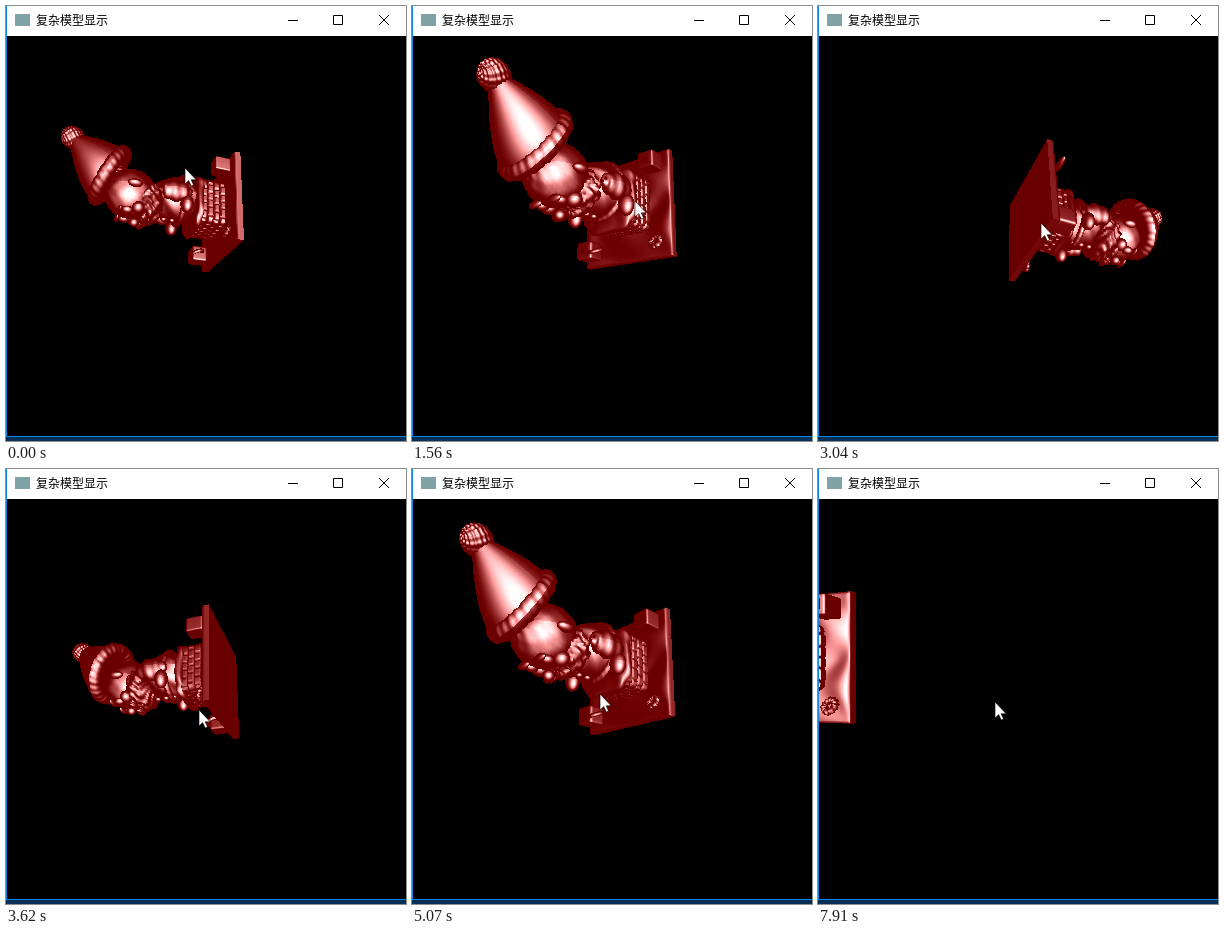
An HTML page with a canvas for the animation above (8000 ms loop, 400 px wide and 435 px high).

```html
<!DOCTYPE html>
<html lang="zh">
<head>
<meta charset="utf-8">
<style>
html, body { margin: 0; width: 100%; height: 100%; overflow: hidden; background: #000; }
canvas { position: absolute; left: 1px; top: 30px; }
svg { position: absolute; left: 0; top: 0; }
text { font: 12px "Noto Sans CJK SC", "Noto Sans CJK", "Noto Sans", sans-serif; }
</style>
</head>
<body>
<canvas id="view" width="399" height="400"></canvas>
<svg width="400" height="435">
  <rect width="400" height="30" fill="#fff"/>
  <rect width="1" height="431" fill="#0c86e2"/>
  <rect y="430" width="400" height="1" fill="#0c86e2"/>
  <rect y="431" width="400" height="4" fill="#063057"/>
  <rect x="9" y="8" width="15" height="12" fill="#7fa3a6"/>
  <text x="30" y="19">复杂模型显示</text>
  <path d="M282 14.5h10M327.5 9.5h9v9h-9zM373 9l10 10M383 9l-10 10" fill="none" stroke="#000"/>
  <path id="cursor" d="M0 0V16L3.7 12.6 6.2 18 8.6 17 6.2 11.8H11.2Z" fill="#fff" stroke="#000" stroke-width=".6"/>
</svg>
<script>
const W = 399, H = 400, DEPTH = 400, LOOP = 8000;
const { sin, cos, abs, sign, min, max, floor, ceil, round, hypot, PI } = Math;
const ctx = document.getElementById('view').getContext('2d');
const cursor = document.getElementById('cursor');
const image = ctx.createImageData(W, H);
const pixels = new Uint32Array(image.data.buffer);
const zbuf = new Float32Array(W * H);

// Model space: x to the figure's side, y to its front, z up.
const verts = [], tris = [];
let offset = [0, 0, 0];

// Adds a parametric surface fn(a, b), a and b in 0..1, with smooth normals.
function surf(n, m, fn) {
  const first = verts.length, grid = [];
  for (let j = 0; j <= m; j++)
    for (let i = 0; i <= n; i++) grid.push(fn(i / n, j / m).map((v, k) => v + offset[k]));
  const at = (i, j) => grid[min(m, max(0, j)) * (n + 1) + min(n, max(0, i))];
  const diff = (p, q) => p.map((v, k) => v - q[k]);
  for (let j = 0; j <= m; j++)
    for (let i = 0; i <= n; i++) {
      const [ax, ay, az] = diff(at(i + 1, j), at(i - 1, j));
      const [bx, by, bz] = diff(at(i, j + 1), at(i, j - 1));
      const nx = ay * bz - az * by, ny = az * bx - ax * bz, nz = ax * by - ay * bx;
      const len = hypot(nx, ny, nz) || 1;
      verts.push([...at(i, j), nx / len, ny / len, nz / len]);
      if (i < n && j < m) {
        const p = first + j * (n + 1) + i, q = p + n + 1;
        tris.push([p, p + 1, q], [p + 1, q + 1, q]);
      }
    }
}

const spow = (v, e) => sign(v) * abs(v) ** e;

// Ellipsoid; a small e squares it off, bump(lon, lat) roughens it.
function blob([x, y, z], [rx, ry, rz], e = 1, bump = () => 1, n = 28, m = 18) {
  surf(n, m, (a, b) => {
    const lon = a * 2 * PI, lat = (b * .98 + .01 - .5) * PI;
    const k = bump(lon, lat), w = k * spow(cos(lat), e);
    return [x + rx * w * spow(cos(lon), e), y + ry * w * spow(sin(lon), e), z + rz * k * spow(sin(lat), e)];
  });
}

// Tilts a point backwards by an angle and moves it to a centre.
const lean = (x, y, z, angle, [cx, cy, cz]) => [
  cx + x, cy + y * cos(angle) - z * sin(angle), cz + y * sin(angle) + z * cos(angle)];

function ring(centre, R, tube, angle, groove, n = 120) {
  surf(n, 14, (a, b) => {
    const lon = a * 2 * PI, t = b * 2 * PI;
    const k = tube * (1 + groove * (sin(lon * 29 + 2 * sin(t)) + .7 * sin(lon * 13 + t)));
    return lean((R + k * cos(t)) * cos(lon), (R + k * cos(t)) * sin(lon), k * sin(t), angle, centre);
  });
}

function buildPlinth() {
  surf(70, 70, (a, b) => {
    const x = 1.12 * (2 * a - 1), y = 1.12 * (2 * b - 1), q = max(abs(x), abs(y));
    const snow = 2 * sin(5.5 * x + 2 * sin(4 * y)) + 1.6 * sin(6 * y - 2 * x);
    const clip = v => 63 * min(1, max(-1, v));
    return [clip(x), clip(y), 4 + snow * max(0, 1 - q ** 6) - 2 * min(1, q) ** 14 - 70 * max(0, q - 1)];
  });
  surf(6, 6, (a, b) => [63 - 126 * a, 126 * b - 63, -6]);
  // brick chimney with a snowy rim
  surf(160, 40, (a, b) => {
    const lon = a * 2 * PI, row = floor(b * 4);
    const joint = b * 4 % 1 < .16 || (a * 20 + row % 2 / 2) % 1 < .12;
    const k = (joint ? 30 : 32) / (cos(lon) ** 8 + sin(lon) ** 8) ** .125;
    return [6 + k * cos(lon), k * sin(lon), 4 + 34 * b];
  });
  blob([6, 0, 40], [37, 37, 7], .6, (o, l) => 1 + .03 * sin(o * 7 + l * 3), 60);
  // a gift, a basket and a wreath in three corners, a cane in the fourth
  blob([46, -46, 15], [10, 10, 11], .2);
  blob([-46, 46, 15], [12, 11, 11], .25);
  ring([-32, 47, 20], 8, 2.5, 1.2, 0, 24);
  ring([46, 46, 9], 6, 3, .4, .2, 40);
  blob([-46, -46, 18], [13, 4, 4]);
}

function buildFigure() {
  offset = [9, -5, 4];
  blob([0, 0, 60], [33, 29, 36], 1, (o, l) => 1 + .03 * sin(o * 6 + l * 8), 40, 24);
  ring([0, 0, 56], 31, 4, 0, .03);
  for (let z = 54; z < 80; z += 11) blob([0, 30, z], [4, 3, 4]);
  for (const side of [-1, 1]) {
    blob([side * 35, 6, 70], [11, 14, 20], 1, (o, l) => 1 + .07 * sin(l * 9 + o));
    blob([side * 36, 22, 56], [9, 12, 8]);
    blob([side * 33, 4, 120], [6, 5, 9]);
    blob([side * 13, 31, 124], [6, 5, 7]);
    blob([side * 13, 32, 133], [9, 4, 3]);
    blob([side * 17, 28, 112], [9, 8, 8]);
    blob([side * 9, 37, 104], [11, 6, 5], 1, (o, l) => 1 + .08 * sin(o * 9 + l * 4));
  }
  blob([0, 2, 120], [32, 32, 33], 1, (o, l) => 1 + .015 * sin(o * 8) * sin(l * 9), 40, 26);
  blob([0, 40, 113], [6, 6, 6]);
  blob([0, 34, 96], [7, 4, 3]);
  blob([0, 13, 97], [33, 25, 19], 1,
    (o, l) => 1 + .05 * sin(o * 13 + 4 * sin(l * 4)) + .04 * sin(o * 7 - l * 9), 70, 24);
  // hat
  const crown = [0, -20, 148];
  ring(crown, 34, 9, .45, .045);
  surf(60, 30, (a, b) => {
    const o = a * 2 * PI, R = 7 + 31 * (1 - b ** 1.5);
    return lean(R * cos(o) + 5 * b, R * sin(o), 64 * b, .69, crown);
  });
  blob([5, -62, 199], [14, 14, 14], 1, (o, l) => 1 + .06 * sin(o * 11 + l * 3) * cos(l * 13), 60, 40);
}

buildPlinth();
buildFigure();

// time, yaw, pitch, distance
const poses = [
  [0, 1.22, .42, -154], [650, 5.3, .2, -70], [900, 6.28, 0, 0], [1160, 6.5, .1, -20],
  [1700, 7.45, .42, -150], [2370, 6.28, .85, -76], [3616, 1.9, .445, -105], [4000, 1, .3, -30],
  [5070, .8, .305, -75], [5360, .8, .305, -75], [6470, .51, .15, -60], [7490, .31, 0, 0]
];
// time, x, y of the pointer
const pointer = [
  [0, 179, 162], [900, 209, 193], [2370, 247, 198], [3616, 193, 241],
  [5070, 188, 225], [6470, 184, 232], [7490, 182, 232], [7910, 177, 233]
];

function track(keys, t) {
  const i = keys.findIndex(k => k[0] > t);
  if (i < 0) return keys[keys.length - 1];
  const a = keys[i - 1], b = keys[i], f = (t - a[0]) / (b[0] - a[0]);
  return a.map((v, k) => v + (b[k] - v) * f);
}

// The window repaints in bursts: first repaint, last repaint, count.
const steps = [0];
for (const [from, to, count] of [
  [150, 1025, 8], [1160, 1290, 2], [1428, 2250, 7], [2370, 3340, 8], [3470, 4200, 6],
  [4630, 5070, 2], [5500, 6470, 8], [6620, 7490, 7], [7910, 7910, 1]
]) for (let i = 0; i < count; i++) steps.push(from + (to - from) * (i / max(1, count - 1)));

// Red ambient plus a tight white highlight.
const shades = Uint32Array.from({ length: 256 }, (_, i) => {
  const light = 1.1 * (i / 255) ** 7;
  const red = min(255, 104 + 240 * light), rest = min(255, max(0, 260 * (light - .02)));
  return 0xff000000 | rest << 16 | rest << 8 | red;
});

function fillTriangle(a, b, c) {
  const area = (b.x - a.x) * (c.y - a.y) - (b.y - a.y) * (c.x - a.x);
  if (!area) return;
  const x0 = max(0, ceil(min(a.x, b.x, c.x))), x1 = min(W - 1, floor(max(a.x, b.x, c.x)));
  const y0 = max(0, ceil(min(a.y, b.y, c.y))), y1 = min(H - 1, floor(max(a.y, b.y, c.y)));
  for (let y = y0; y <= y1; y++)
    for (let x = x0; x <= x1; x++) {
      const v = ((x - a.x) * (c.y - a.y) - (y - a.y) * (c.x - a.x)) / area;
      const w = ((b.x - a.x) * (y - a.y) - (b.y - a.y) * (x - a.x)) / area;
      const u = 1 - v - w;
      if (u < 0 || v < 0 || w < 0) continue;
      const near = u * a.s + v * b.s + w * c.s, p = y * W + x;
      if (near <= zbuf[p]) continue;
      zbuf[p] = near;
      pixels[p] = shades[floor(255 * min(1, max(0, u * a.l + v * b.l + w * c.l)))];
    }
}

function draw(t) {
  const [, yaw, pitch, tz] = track(poses, t);
  const slide = min(1, max(0, (t - 5360) / 2130));
  const tx = 17 - 236 * slide, ty = -30 - 10 * slide;
  const cy = cos(yaw), sy = sin(yaw), cp = cos(pitch), sp = sin(pitch);
  const turn = (x, y, z) => [
    x * cy - z * sy, y * cp - sp * (x * sy + z * cy), y * sp + cp * (x * sy + z * cy)];
  const points = verts.map(([x, y, z, nx, ny, nz]) => {
    const [px, py, pz] = turn(x, y, z), [lx, ly, lz] = turn(nx, ny, nz);
    const s = DEPTH / (DEPTH - pz - tz);
    return { x: 199 + s * (px + tx), y: 200 + s * (py + ty), s, l: .15 * lx + .05 * ly + .985 * lz };
  });
  pixels.fill(0xff000000);
  zbuf.fill(0);
  for (const [a, b, c] of tris) fillTriangle(points[a], points[b], points[c]);
  ctx.putImageData(image, 0, 0);
  const [, x, y] = track(pointer, t);
  cursor.setAttribute('transform', `translate(${round(x)} ${round(y)})`);
}

let shown = -1;
const start = performance.now();
function tick() {
  const t = (performance.now() - start) % LOOP;
  const step = steps.findLast(s => s <= t);
  if (step !== shown) draw(shown = step);
  requestAnimationFrame(tick);
}
tick();
</script>
</body>
</html>
```
